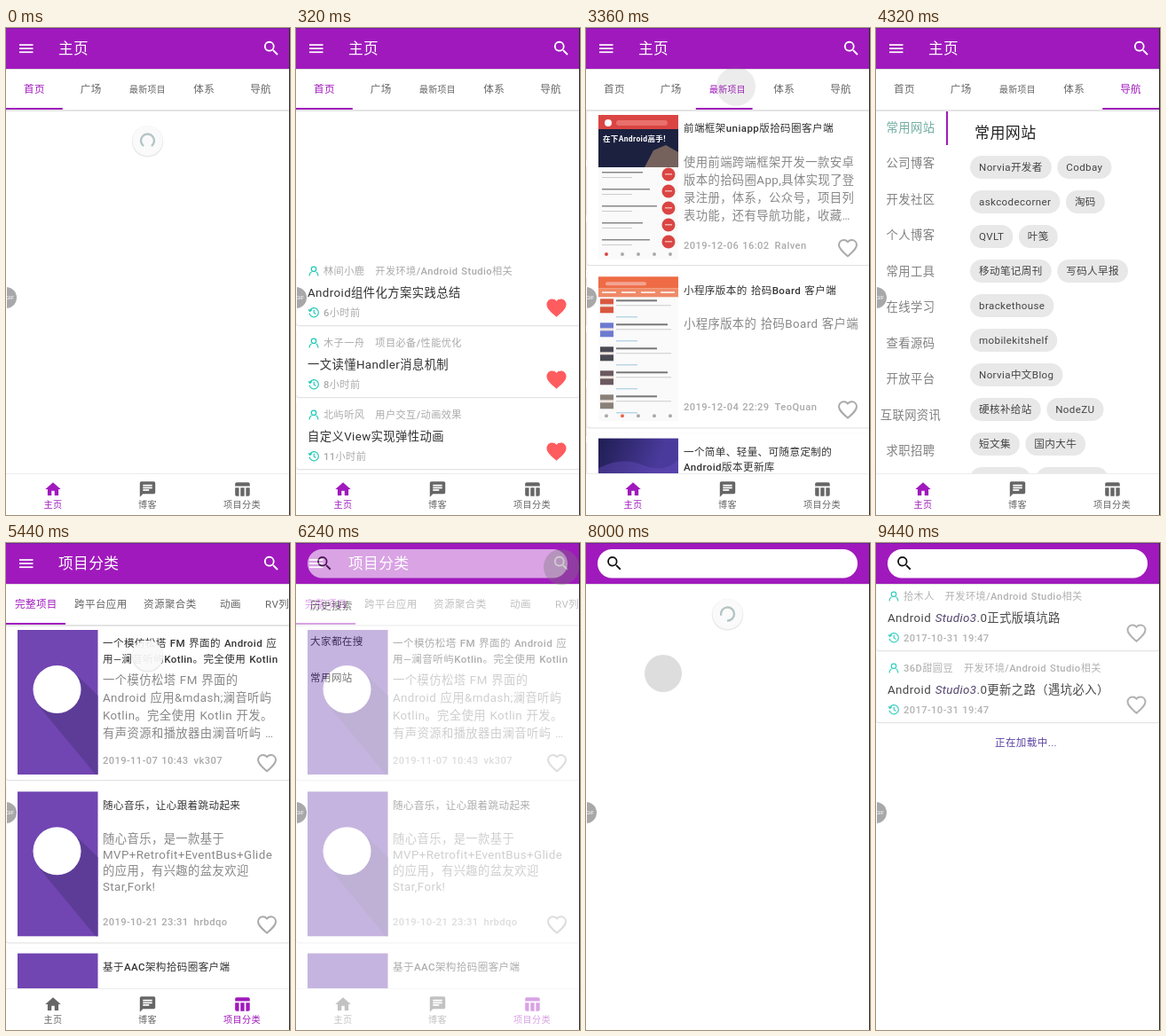
An HTML page for the animation above (9.6 s loop, 320 by 549 pixels).

```html
<!DOCTYPE html>
<html lang="zh-CN">
<head>
<meta charset="utf-8">
<title>App tour</title>
<style>
html, body { margin: 0; width: 100%; height: 100%; overflow: hidden; background: #fff; }
svg { display: block; }
text { font-family: Roboto, "Noto Sans CJK SC", "Noto Sans CJK", sans-serif; letter-spacing: .4px; word-spacing: .8px; white-space: pre; }
</style>
</head>
<body>
<svg id="stage" width="320" height="549" viewBox="0 0 320 549"></svg>
<script>
const LOOP = 9600, TICK = 160;
const PURPLE = '#a019bd', GREY = '#666', TEAL = '#1cc8b6';
const SMALL = 11.2, BODY = 11.56, LARGE = 13.33;
const stage = document.getElementById('stage');

const ICON = {
  home: 'M10 20v-6h4v6h5v-8h3L12 3 2 12h3v8z',
  chat: 'M20 2H4c-1.1 0-2 .9-2 2v18l4-4h14c1.1 0 2-.9 2-2V4c0-1.1-.9-2-2-2zM6 9h12v2H6V9zm8 5H6v-2h8v2zm4-6H6V6h12v2z',
  table: 'M10 10h5v11h-5zM17 21h3c1.1 0 2-.9 2-2v-9h-5zM20 3H5c-1.1 0-2 .9-2 2v3h19V5c0-1.1-.9-2-2-2zM3 19c0 1.1.9 2 2 2h3V10H3z',
  search: 'M15.5 14h-.8l-.3-.3A6.5 6.5 0 1 0 13.7 14.4l.3.3v.8l5 5 1.5-1.5zm-6 0a4.5 4.5 0 1 1 0-9 4.5 4.5 0 0 1 0 9z',
  heart: 'M12 21.3l-1.5-1.3C5.4 15.4 2 12.3 2 8.5 2 5.4 4.4 3 7.5 3c1.7 0 3.4.8 4.5 2.1C13.1 3.8 14.8 3 16.5 3 19.6 3 22 5.4 22 8.5c0 3.8-3.4 6.9-8.5 11.5z',
  user: 'M12 3a5 5 0 1 1 0 10a5 5 0 1 1 0-10M3 22c0-5 3-8 6-9M21 22c0-5-3-8-6-9',
  clock: 'M4 8a9.5 9.5 0 1 1-1 6M1 6l3 4 4-3M12.5 7v6l4 2.5'
};

function el(parent, tag, attrs = {}, content) {
  const node = document.createElementNS('http://www.w3.org/2000/svg', tag);
  set(node, attrs);
  if (content !== undefined) node.textContent = content;
  return parent.appendChild(node);
}
function set(node, attrs) {
  for (const key in attrs) node.setAttribute(key, attrs[key]);
}
const group = (parent, attrs) => el(parent, 'g', attrs);
const show = (node, on) => set(node, { display: on ? 'inline' : 'none' });
const rect = (p, x, y, width, height, fill, rx = 0) => el(p, 'rect', { x, y, width, height, fill, rx });
const circle = (p, cx, cy, r, fill) => el(p, 'circle', { cx, cy, r, fill });
// y is the vertical middle of the line
function text(p, x, y, str, size, fill, attrs = {}) {
  return el(p, 'text', { x, y: y + size * .37, 'font-size': size, fill, ...attrs }, str);
}
const centred = (p, x, y, str, size, fill) => text(p, x, y, str, size, fill, { 'text-anchor': 'middle' });
// Latin runs are medium, Chinese runs stay regular
function medium(p, x, y, str, size, fill) {
  const line = text(p, x, y, '', size, fill);
  for (const run of str.match(/[\x20-\x7e]+|[^\x20-\x7e]+/g))
    el(line, 'tspan', { 'font-weight': run.charCodeAt(0) < 127 ? 500 : 400 }, run);
  return line;
}
const small = (p, x, y, str) => medium(p, x, y, str, SMALL, '#aaa');
const endOf = node => +node.getAttribute('x') + node.getComputedTextLength();
function icon(p, name, x, y, scale, fill, attrs = {}) {
  return el(p, 'path', { d: ICON[name], fill, transform: `translate(${x} ${y}) scale(${scale}) translate(-12 -12)`, ...attrs });
}
const lineIcon = (p, name, x, y) => icon(p, name, x, y, .54, 'none', { stroke: TEAL, 'stroke-width': 2.2 });
const heart = (p, x, y, liked) => icon(p, 'heart', x, y, liked ? 1.1 : 1, liked ? '#ff5c5f' : 'none',
  liked ? {} : { stroke: '#aaa', 'stroke-width': 2 });

function card(p, y, height) {
  rect(p, 0, y, 320, height + 1.2, '#e4e4e4', 3);
  rect(p, .3, y - .3, 319, height + .3, '#fff', 3);
}
function chips(p, left, top, rows) {
  rows.forEach((row, i) => {
    let x = left;
    const y = top + i * 39;
    for (const label of row) {
      const box = rect(p, x, y - 13, 0, 26, '#e8e8e8', 13);
      const width = text(p, x + 10, y, label, BODY, '#444').getComputedTextLength() + 20;
      set(box, { width });
      x += width + 6.5;
    }
  });
}

function articleCard(p, top, { author, topic, title, time, liked }) {
  card(p, top, 75);
  const body = group(p);
  lineIcon(body, 'user', 20, top + 14);
  const name = small(body, 31, top + 14, author);
  small(body, endOf(name) + 12, top + 14, topic);
  const line = text(body, 13, top + 38, '', LARGE, '#333');
  title.split('*').forEach((part, i) =>
    el(line, 'tspan', i % 2 ? { 'font-style': 'italic', fill: '#3f2f5c' } : {}, part));
  lineIcon(body, 'clock', 20, top + 60.5);
  small(body, 31, top + 61, time);
  heart(body, 293.5, top + 55.5, liked);
  return body;
}
function shareCard(p, i, author, hours, ...lines) {
  const top = 93 + i * 62.2;
  card(p, top, 55.5);
  lines.forEach((s, k) => text(p, 13, top + 19 + k * 19, s, LARGE, '#333'));
  if (!author) return;
  lineIcon(p, 'user', 20, top + 40);
  const x = endOf(small(p, 31, top + 40, author)) + 33;
  lineIcon(p, 'clock', x - 10, top + 40);
  small(p, x, top + 40, hours + '小时前');
}
function projectCard(p, i, thumb, { title, desc = [], start = 154, pitch = 20, date, author }) {
  const top = 93 + i * 182.3;
  const g = group(p, { transform: `translate(0 ${top})` });
  card(g, i ? -1 : 0, i ? 176 : 174);
  thumb(group(g, { transform: 'translate(13 5)' }));
  title.forEach((s, k) => medium(g, 109, 20 + k * 17.5, s, BODY, '#333'));
  desc.forEach((s, k) => text(g, 109, start - 93 + k * pitch, s, LARGE, '#888'));
  if (!date) return;
  const stamp = small(g, 109, 152, date);
  small(g, endOf(stamp) + 6, 152, author);
  heart(g, 294, 155);
}
function sidePage(p, names, heading, rows) {
  names.forEach((s, i) => centred(p, 39, 112 + i * 40.5, s, LARGE, i ? '#808080' : '#6fac9f'));
  rect(p, 79, 93, 2, 39, PURPLE);
  text(p, 111, 118, heading, 17, '#222');
  chips(p, 106, 157, rows);
}

// Project thumbnails, 90 by 163
function redAppThumb(p) {
  rect(p, 0, 0, 90, 163, '#fafafa');
  rect(p, 0, 0, 90, 16, '#da4543');
  circle(p, 11, 9, 4, '#fff');
  rect(p, 20, 6, 58, 6, '#e8706c', 3);
  rect(p, 0, 16, 90, 43, '#1c2140');
  el(p, 'path', { d: 'M52 59L62 40L76 34L90 42V59z', fill: '#75625c' });
  text(p, 5, 27, '在下Android高手!', 8.5, '#fff', { 'font-weight': 700 });
  for (let i = 0; i < 5; i++) {
    const y = 67 + i * 19;
    rect(p, 4, y - 3, 46 + i % 3 * 8, 1.5, '#888');
    rect(p, 4, y + 3, 34, 1, '#ccc');
    circle(p, 79, y, 7.5, '#da4543');
    rect(p, 75, y - 1, 8, 1.5, '#f2b2b0');
  }
  for (let i = 0; i < 5; i++) circle(p, 9 + i * 18, 157, 2, i ? '#aaa' : '#da4543');
}
function orangeAppThumb(p) {
  rect(p, 0, 0, 90, 163, '#fafafa');
  rect(p, 0, 0, 90, 13, '#ee6b45');
  rect(p, 8, 6, 46, 4, '#f3a593', 2);
  rect(p, 0, 13, 90, 10, '#f08a68');
  for (let i = 0; i < 4; i++) rect(p, 4 + i * 22, 17, 16, 1.5, '#fff');
  ['#d9573f', '#6c7bd0', '#4a4a55', '#6a5a60', '#8a8078'].forEach((fill, i) => {
    const y = 25 + i * 27;
    rect(p, 2, y, 15, 16, fill);
    rect(p, 2, y + 6, 15, 3, '#eee4e0');
    rect(p, 20, y + 1, 46 + i % 2 * 12, 2, '#777');
    rect(p, 20, y + 7, 62, 1, '#ccc');
    rect(p, 20, y + 20, 24, 1, '#9bc5dd');
  });
  for (let i = 0; i < 5; i++) circle(p, 9 + i * 18, 157, 2, i === 1 ? '#e9654c' : '#aaa');
}
function nightThumb(p) {
  rect(p, 0, 0, 90, 163, 'url(#night)');
  el(p, 'path', { d: 'M0 34Q25 20 50 30T90 24V60H0z', fill: '#6a4fc0', opacity: .4 });
}
function violetThumb(p) {
  rect(p, 0, 0, 90.5, 163, '#7145b2');
  el(p, 'path', { d: 'M64 48L90.5 74V163H88L25 87z', fill: '#5d3c97' });
  circle(p, 44.5, 67, 27, '#fff');
}

const defs = el(stage, 'defs');
const night = el(defs, 'linearGradient', { id: 'night', x2: .6, y2: .4 });
el(night, 'stop', { offset: 0, 'stop-color': '#1f1d52' });
el(night, 'stop', { offset: 1, 'stop-color': '#4a3a9c' });

rect(stage, 0, 0, 320, 549, '#fff');

// Pages behind the five home tabs
const track = group(stage);
const [homePage, squarePage, newPage, treePage, sitePage] =
  [0, 1, 2, 3, 4].map(i => group(track, { transform: `translate(${i * 320} 0)` }));

[
  ['林间小鹿', '开发环境/Android Studio相关', 'Android组件化方案实践总结', '6小时前'],
  ['木子一舟', '项目必备/性能优化', '一文读懂Handler消息机制', '8小时前'],
  ['北屿听风', '用户交互/动画效果', '自定义View实现弹性动画', '11小时前']
].forEach(([author, topic, title, time], i) =>
  articleCard(homePage, 260 + i * 81, { author, topic, title, time, liked: true }));

[
  ['pelund', 3, 'DX 已被弃用，请尽快迁移至 D8'],
  ['沐小禾家的陈团子', 5, 'Android打包、签名与混淆'],
  ['墨绿旅人', 8, '详解Gradle自动实现Android组件化'],
  ['微雨青舟', 10, 'Android启动页延伸至状态栏'],
  ['Junivelor', 10, 'Android性能优化之绘制优化'],
  ['qtmellow', 19, 'Android 基于 Uiautomator 测试--基本 API'],
  ['', 0, 'Android App Dark Theme（暗黑模式）适配指', '南']
].forEach((row, i) => shareCard(squarePage, i, ...row));

projectCard(newPage, 0, redAppThumb, {
  title: ['前端框架uniapp版拾码圈客户端'], start: 151,
  desc: ['使用前端跨端框架开发一款安卓', '版本的拾码圈App,具体实现了登', '录注册，体系，公众号，项目列', '表功能，还有导航功能，收藏…'],
  date: '2019-12-06 16:02', author: 'Ralven'
});
projectCard(newPage, 1, orangeAppThumb, {
  title: ['小程序版本的 拾码Board 客户端'], start: 151,
  desc: ['小程序版本的 拾码Board 客户端'],
  date: '2019-12-04 22:29', author: 'TeoQuan'
});
projectCard(newPage, 2, nightThumb, { title: ['一个简单、轻量、可随意定制的', 'Android版本更新库'] });

sidePage(treePage,
  ['开发环境', '基础知识', '用户交互', '动画效果', '网络访问', '图片加载', '数据存储', '性能优化', '项目必备', '热门专题'],
  '开发环境',
  [['Android Studio相关'], ['gradle', '官方发布'], ['adb', '调试工具'], ['版本管理', '持续集成']]);
sidePage(sitePage,
  ['常用网站', '公司博客', '开发社区', '个人博客', '常用工具', '在线学习', '查看源码', '开放平台', '互联网资讯', '求职招聘'],
  '常用网站',
  [['Norvia开发者', 'Codbay'], ['askcodecorner', '淘码'], ['QVLT', '叶笺'], ['移动笔记周刊', '写码人早报'],
   ['brackethouse'], ['mobilekitshelf'], ['Norvia中文Blog'], ['硬核补给站', 'NodeZU'], ['短文集', '国内大牛'],
   ['码农日记', 'Mobile资讯']]);

// Category page
const categoryPage = group(stage);
rect(categoryPage, 0, 93, 320, 410, '#fff');
const categoryList = group(categoryPage);
projectCard(categoryList, 0, violetThumb, {
  title: ['一个模仿松塔 FM 界面的 Android 应', '用—澜音听屿Kotlin。完全使用 Kotlin'],
  desc: ['一个模仿松塔 FM 界面的', 'Android 应用&mdash;澜音听屿', 'Kotlin。完全使用 Kotlin 开发。', '有声资源和播放器由澜音听屿 …'],
  date: '2019-11-07 10:43', author: 'vk307'
});
projectCard(categoryList, 1, violetThumb, {
  title: ['随心音乐，让心跟着跳动起来'], start: 151, pitch: 18,
  desc: ['随心音乐，是一款基于', 'MVP+Retrofit+EventBus+Glide', '的应用，有兴趣的盆友欢迎', 'Star,Fork!'],
  date: '2019-10-21 23:31', author: 'hrbdqo'
});
projectCard(categoryList, 2, violetThumb, { title: ['基于AAC架构拾码圈客户端'] });

function spinner(parent) {
  const node = group(parent);
  circle(node, 0, .8, 17.8, '#e9e9e9');
  circle(node, 0, 0, 17, '#fafafa');
  const arc = el(node, 'path', { d: 'M-4.5 6A7.5 7.5 0 1 1 4.5 6', fill: 'none', stroke: '#b4c4c4', 'stroke-width': 2.4 });
  return (y, opacity, turn = 0) => {
    set(node, { transform: `translate(159.5 ${y})`, opacity });
    set(arc, { transform: `rotate(${turn})`, opacity: opacity < 1 ? 0 : 1 });
  };
}
const listSpinner = spinner(stage);

// Tab bars
rect(stage, 0, 92, 320, 2, '#e4e4e4');
rect(stage, 0, 46, 320, 46, '#fff');
const homeTabs = group(stage), categoryTabs = group(stage);
const TAB = 63.8;
const tabLabels = ['首页', '广场', '最新项目', '体系', '导航'].map((s, i) =>
  centred(homeTabs, (i + .5) * TAB, 69, s, i === 2 ? 9.9 : BODY, GREY));
const indicator = rect(homeTabs, 0, 90, TAB, 2, PURPLE);
[[10, '完整项目'], [77, '跨平台应用'], [155, '资源聚合类'], [241, '动画'], [292, 'RV列表动效']]
  .forEach(([x, s], i) => text(categoryTabs, x, 69, s, BODY, i ? GREY : PURPLE));
rect(categoryTabs, 0, 90, 67, 2, PURPLE);

function header(p) {
  rect(p, 0, 46, 320, 1, '#ddd');
  rect(p, 0, 0, 320, 46, PURPLE);
  rect(p, 0, 0, 320, 1, '#7420a8');
}
header(stage);
[18.2, 22.3, 26.4].forEach(y => rect(stage, 15, y, 15.5, 1.7, '#fff'));
const heading = text(stage, 59, 23, '', 16.7, '#fff');
icon(stage, 'search', 299, 23, .9, '#fff');

// Bottom bar
rect(stage, 0, 502, 320, 1, '#ececec');
rect(stage, 0, 503, 320, 46, '#fff');
const navItems = [['home', '主页'], ['chat', '博客'], ['table', '项目分类']].map(([name, label], i) => {
  const g = group(stage), x = 53 + i * 106.5;
  icon(g, name, x, 520, .87);
  centred(g, x, 537, label, 10.1);
  [...g.children].forEach(n => n.removeAttribute('fill'));
  return g;
});

// Search screen
const search = group(stage);
rect(search, 0, 0, 320, 549, '#fff');
const suggestions = group(search), results = group(search);
text(suggestions, 16, 71, '历史搜索', BODY, '#222');
text(suggestions, 16, 111, '大家都在搜', BODY, '#222');
const sitesTitle = text(suggestions, 16, 0, '常用网站', BODY, '#222');
const searchChips = group(suggestions);
chips(searchChips, 3, 147, [['面试', 'Studio3', '动画', '自定义View'], ['性能优化 速度', 'gradle', 'Camera 相机'], ['代码混淆 安全', '逆向 加固']]);
chips(searchChips, 3, 304, [['国内大牛博客集合', '国外大牛博客集合'], ['jcenter仓库', 'norvia仓库', 'maven仓库'],
  ['青岚的博客', '陆棠的博客', '今天最火的开源项目'], ['最新项目', 'askcodecorner', '硬核补给站', '淘码'],
  ['写码人早报', 'brackethouse'], ['Android开源项目解析', 'mobilekitshelf'], ['Android开发热门专题', 'Android面试相关']]);
rect(searchChips, 316, 46, 3, 365, '#b8b8b8');

const topic = '开发环境/Android Studio相关', time = '2017-10-31 19:47';
const resultBodies = [
  articleCard(results, 46, { author: '拾木人', topic, time, title: 'Android *Studio3*.0正式版填坑路' }),
  articleCard(results, 127, { author: '36D甜圆豆', topic, time, title: 'Android *Studio3*.0更新之路（遇坑必入）' }),
  centred(results, 169, 225, '正在加载中...', BODY, '#4c2f9a')
];
const searchSpinner = spinner(search);
header(search);
rect(search, 13, 7, 293, 32.5, '#fff', 16.2);
icon(search, 'search', 32, 23, .87, '#111');

// Recorder badge, touch mark and right edge
circle(stage, 0, 304, 12, '#a8a8a8');
rect(stage, 0, 291, 1, 26, '#fff');
text(stage, 0, 304, 'GIF', 6, '#fff', { style: 'letter-spacing:0' });
const touch = circle(stage, 0, 0, 20, '#777');
rect(stage, 319, 0, 1, 549, '#2a2a2a');

// start, page position, indicator position
const swipes = [[0, 0, 0], [2240, .857, .72], [2400, 1, 1], [3040, 1.4, 1.2], [3200, 1.96, 1.8], [3360, 1.997, 1.94],
  [3520, 2, 2], [3680, 2.4, 2.2], [3840, 2.96, 2.8], [4000, 3, 3], [4160, 3.86, 3.72], [4320, 4, 4]];
// start, end, x, y
const touches = [[2240, 2400, 99.5, 62.5], [3040, 3520, 169, 66], [3680, 4000, 225, 66], [4160, 4320, 288, 66],
  [5120, 5440, 266, 525], [6240, 6400, 299, 27], [7840, 8160, 87, 147]];

function drawTouch(t) {
  const hit = touches.find(([start, end]) => t >= start && t < end);
  show(touch, hit);
  if (!hit) return;
  const age = (t - hit[0]) / TICK;
  set(touch, { cx: hit[2], cy: hit[3], r: 20 + age, opacity: .36 - age * .11 });
}

function draw(t) {
  const [, page, tab] = swipes.filter(([start]) => start <= t).pop();
  set(track, { transform: `translate(${-320 * page} 0)` });
  set(indicator, { x: TAB * tab });
  tabLabels.forEach((n, i) => set(n, { fill: i === Math.round(page) ? PURPLE : GREY }));
  show(homePage, t >= 160);

  const inCategory = t >= 5280;
  show(categoryPage, inCategory);
  show(categoryTabs, inCategory);
  show(homeTabs, !inCategory);
  show(categoryList, t >= 5440);
  heading.textContent = inCategory ? '项目分类' : '主页';
  navItems.forEach((g, i) => set(g, { fill: i === (inCategory ? 2 : 0) ? PURPLE : GREY }));
  listSpinner(127, t === 0 || t === 5280 ? 1 : t === 160 || t === 5440 ? .92 : 0);

  show(search, t >= 6240);
  set(search, { opacity: t < 6400 ? .6 : 1 });
  const loaded = t >= 6880;
  show(searchChips, loaded);
  set(sitesTitle, { y: (loaded ? 269 : 152) + 4.3 });
  show(suggestions, t < 8000);
  show(results, t >= 8800);
  searchSpinner(80, t >= 8000 && t < 8800 ? 1 : 0, t / 2);
  resultBodies.forEach(n => set(n, { opacity: Math.min(.9, .4 + (t - 8800) / 1280) }));
  drawTouch(t);
}

function loop() {
  const t = performance.now() % LOOP;
  draw(Math.floor(t / TICK) * TICK);
  requestAnimationFrame(loop);
}
loop();
</script>
</body>
</html>
```
